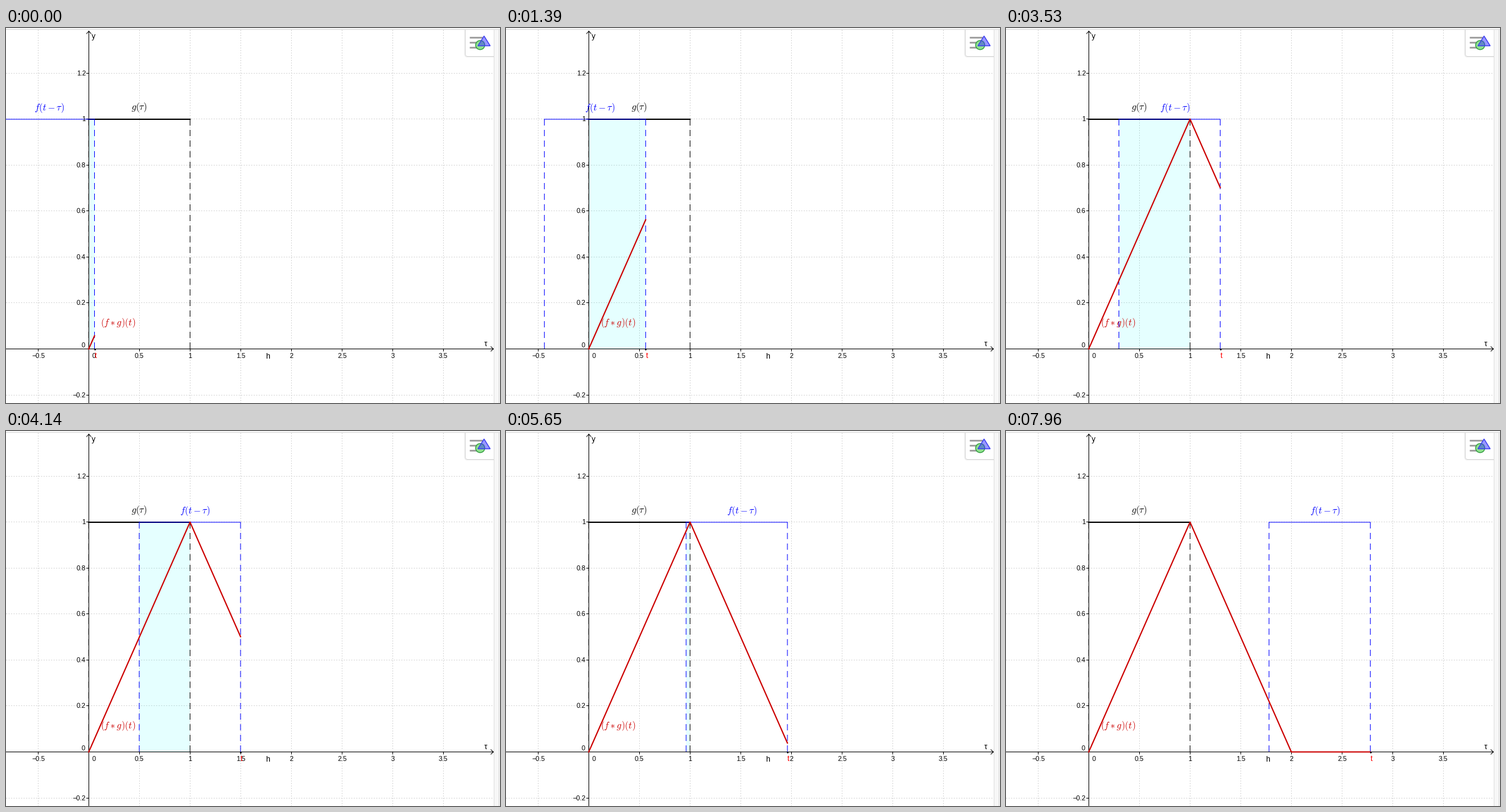
A matplotlib script that plays this animation: 790 by 600 pixels, repeating every 8 s.

```python
import numpy as np
import matplotlib.pyplot as plt
from matplotlib.animation import FuncAnimation
from matplotlib.patches import Circle, FancyBboxPatch, Polygon, Rectangle

W, H, DPI = 790, 600, 100
LOOP, DT = 8000, 20
PT = 72 / DPI                       # points per pixel
X0, Y0, UX, UY = 132.3, 513.5, 162.0, 367.7
TOP = 146                           # height of both pulses
BLUE, RED = "#0000ff", "#cc0000"
MATH, TICK, NAME = 15, 10.6, 12     # text sizes in pixels

plt.rcParams["font.family"] = "Liberation Sans"
plt.rcParams["mathtext.fontset"] = "cm"

fig = plt.figure(figsize=(W / DPI, H / DPI), dpi=DPI, facecolor="white")
ax = fig.add_axes([0, 0, 1, 1])
ax.set_xlim(0, W)
ax.set_ylim(H, 0)
ax.axis("off")


def px(x):
    return X0 + UX * x


def py(y):
    return Y0 - UY * y


def crisp(v):
    return np.floor(v) + 0.5


def line(xs, ys, color="black", width=1.0, z=2, **kw):
    (ln,) = ax.plot(xs, ys, color=color, lw=width * PT, zorder=z, **kw)
    ln.set_snap(False)
    return ln


def dashed(x, color, z):
    return line([x, x], [TOP, Y0], color, 1, z, ls=(0, (10, 7)))


def text(x, y, s, size=TICK, color="black", ha="center"):
    return ax.text(x, y, s, fontsize=size * PT, color=color, ha=ha,
                   va="baseline", zorder=6)


def number(v):
    return f"{v:g}".replace("-", "\u2212")


def draw_plane():
    dots = dict(color="#d8d8d8", z=0, ls=(0, (2, 2)))
    for k in range(-1, 8):
        if k == 0:
            continue
        x = crisp(px(k / 2))
        line([x, x], [3, H], **dots)
        line([x, x], [514, 517])
        text(x + (k < 0), 528, number(k / 2))
    for k in range(-1, 7):
        if k == 0:
            continue
        y = crisp(py(k / 5))
        line([0, 780], [y, y], **dots)
        line([129, 132], [y, y])
        text(127.5, y + 3.8, number(k / 5), ha="right")
    text(141, 528, "0")
    text(124, 511, "0")

    x, y = crisp(X0), crisp(Y0)
    line([x, x], [5, H])
    line([x - 3.5, x, x + 3.5], [9, 5, 9])
    line([0, 779.5], [y, y])
    line([775.5, 779.5, 775.5], [y - 3.5, y, y + 3.5])
    text(140, 17, "y", NAME)
    text(767, 509, "\u03c4", NAME)
    text(418.3, 529, "h", NAME)


def draw_frame():
    ax.add_patch(Rectangle((0, 0), W, 2, fc="#f8f8f8", ec="none", zorder=7))
    ax.add_patch(Rectangle((781, 3), 7, H, fc="#f7f7f7", ec="none", zorder=7))
    line([0, W], [2.5, 2.5], "#d9d9d9", z=8)
    line([780.5, 780.5], [3, H], "#dedede", z=8)
    line([788.5, 788.5], [3, H], "#d4d4d4", z=8)


def draw_button():
    clip = Rectangle((730, 3), 50, 60, transform=ax.transData)
    for grow, shade in ((1, "#eeeeee"), (0, "#d6d6d6")):
        box = FancyBboxPatch((738.5 - grow, -10), 60, 51.5 + grow,
                             boxstyle="round,pad=4", fc="white", ec=shade,
                             lw=PT, zorder=9)
        ax.add_patch(box)
        box.set_clip_path(clip)
    for y, end in ((15.5, 761), (23.5, 754), (31.5, 754)):
        line([743, end], [y, y], "#999999", 2.6, 10)
    ax.add_patch(Circle((758.3, 27.3), 7.3, fc="#90e090", ec="#2e9a3c",
                        lw=1.3 * PT, zorder=11))
    ax.add_patch(Polygon([(764.5, 12.8), (774.3, 28.5), (754.7, 28.5)],
                         fc=(0.2, 0.2, 1, 0.5), ec="#3c3cf0",
                         lw=1.4 * PT, zorder=12))


draw_plane()
draw_frame()
draw_button()

# fixed pulse g
line([px(0), px(1)], [TOP, TOP], width=2, z=3)
dashed(px(0), "black", 3)
dashed(px(1), "black", 3)
text(212.5, 131.2, r"$g(\tau)$", MATH)
text(179.2, 476, r"$(f*g)(t)$", MATH, RED)

# moving parts
area = ax.add_patch(Rectangle((px(0), TOP), 0, Y0 - TOP, fc="#00ffff",
                              ec="none", alpha=0.1, zorder=1))
roof = line([], [], BLUE, 1, 4)
left = dashed(0, BLUE, 4)
right = dashed(0, BLUE, 4)
conv = line([], [], RED, 2, 5)
point = line([], [], z=5, marker="o", ms=2.6 * PT, mew=0)
f_label = text(0, 132, r"$f(t-\tau)$", MATH, BLUE)
t_label = text(0, 528, "t", NAME, "#ff0000")

# key points: time in ms, updates so far, value of t
KEY_MS, KEY_STEP, KEY_T = np.array([
    (0, 0, 0.057), (350, 2, 0.236), (1390, 6, 0.562), (2400, 10, 0.918),
    (3530, 15, 1.298), (4900, 22, 1.766), (6660, 31, 2.352),
    (7960, 39, 2.78)]).T


def update(i):
    step = np.floor(np.interp(i * DT + DT / 2, KEY_MS, KEY_STEP))
    t = np.interp(step, KEY_STEP, KEY_T)
    x = px(t)

    a, b = max(0, t - 1), min(1, t)
    area.set_x(px(a))
    area.set_width(UX * max(0, b - a))
    roof.set_data([x - UX, x], [TOP, TOP])
    left.set_xdata([x - UX, x - UX])
    right.set_xdata([x, x])

    s = np.array([k for k in (0, 1, 2) if k < t] + [t])
    conv.set_data(px(s), py(np.clip(1 - abs(s - 1), 0, 1)))
    point.set_data([x], [Y0])
    f_label.set_x(x - 72.8)
    t_label.set_x(x + 1.9)
    return area, roof, left, right, conv, point, f_label, t_label


anim = FuncAnimation(fig, update, frames=LOOP // DT, interval=DT,
                     repeat=True, repeat_delay=0, blit=False)
plt.show()
```
